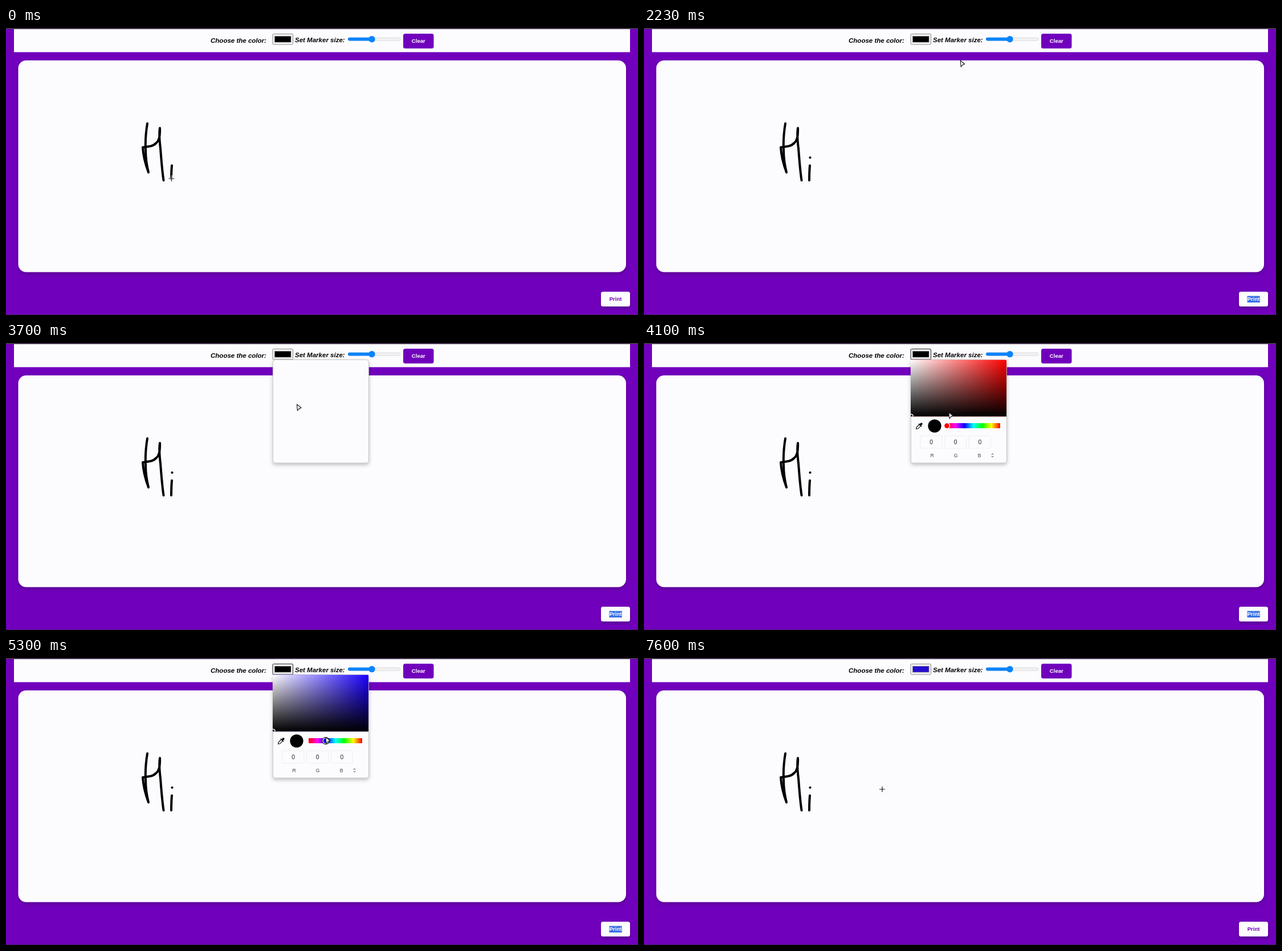
Recreate the animation shown at these times as an HTML page. Size 1109 by 505 pixels, loop 8000 ms.

```html
<!DOCTYPE html>
<html lang="en">
<head>
<meta charset="utf-8">
<title>Whiteboard</title>
<style>
html, body { margin: 0; width: 100%; height: 100%; overflow: hidden; background: #7100bd; }
svg { display: block; width: 1109px; height: 505px; font-family: "Liberation Sans", Arial, sans-serif; }
.label { font: italic bold 11.52px "Liberation Sans", Arial, sans-serif; }
.button { font-weight: bold; font-size: 9.6px; text-anchor: middle; }
.ink { fill: none; stroke: #000; stroke-width: 4; stroke-linecap: round; stroke-linejoin: round; }
.field rect { fill: #fcfcfe; stroke: #ededed; }
.field text { text-anchor: middle; font-size: 10.3px; fill: #222; }
.field .channel { font-size: 8.6px; fill: #444; }
</style>
</head>
<body>
<svg viewBox="0 0 1109 505">
  <defs>
    <linearGradient id="white"><stop stop-color="#fff"/><stop offset="1" stop-color="#fff" stop-opacity="0"/></linearGradient>
    <linearGradient id="black" x2="0" y2="1"><stop stop-opacity="0"/><stop offset="1"/></linearGradient>
    <linearGradient id="rainbow"></linearGradient>
    <clipPath id="area"><rect x="468" y="29.5" width="168" height="100"/></clipPath>
    <filter id="shadow" x="-10%" y="-10%" width="120%" height="130%">
      <feDropShadow dx="0" dy="3" stdDeviation="3" flood-opacity=".25"/>
    </filter>
  </defs>

  <rect width="1109" height="505" fill="#7100bd"/>
  <rect width="1109" height="2" fill="#46374f"/>
  <rect y="504" width="1109" height="1" fill="#4c1a70"/>
  <rect x="14" y="2" width="1081" height="40.5" fill="#fcfcfe"/>
  <rect x="21.5" y="57" width="1066.5" height="372.5" rx="14" fill="#fcfcfe" filter="url(#shadow)"/>

  <text class="label" x="359" y="26.4">Choose the color:</text>
  <text class="label" x="507" y="25.4">Set Marker size:</text>
  <rect id="frame" x="468" y="10.5" width="35.5" height="18.5" rx="1.5" fill="#f3f3f3"/>
  <rect id="swatch" x="471.5" y="14.5" width="28.5" height="10.5" stroke="#777" stroke-width=".7"/>

  <rect x="600" y="17" width="92" height="5.2" rx="2.6" fill="#f1f1f1" stroke="#c9c9c9" stroke-width=".6"/>
  <rect x="600" y="16.8" width="42" height="5.6" rx="2.8" fill="#0a84fa"/>
  <circle cx="642" cy="19.6" r="5.7" fill="#0a84fa"/>

  <rect x="697" y="10" width="53.5" height="26" rx="3.5" fill="#7100bd"/>
  <text class="button" x="723.8" y="25.5" fill="#fff">Clear</text>
  <rect x="1044" y="464" width="51" height="26" rx="3.5" fill="#fcfcfe" filter="url(#shadow)"/>
  <rect id="highlight" x="1058.5" y="471.5" width="22.3" height="11.5" fill="#3a70e4"/>
  <text id="print" class="button" x="1069.6" y="480.2">Print</text>

  <path class="ink" d="M248 168Q244 192 245 214Q245 234 250 254Q241 230 240 210L250 208.500Q258 208 264 202Q271 196 270 176Q268 188 271 212Q274 252 276.500 268"/>
  <path id="stem" class="ink"/>
  <circle id="dot" cx="291.5" cy="228"/>
  <circle id="newDot" cx="418" cy="231" r="1.7" fill="#260ed2"/>

  <g id="popup">
    <rect x="468.3" y="29.500" width="168.200" height="181.500" rx="4" fill="#fcfcfe" stroke="#b9b9b9" stroke-width=".8" filter="url(#shadow)"/>
    <g id="picker">
      <g clip-path="url(#area)">
        <rect id="hueArea" x="468" y="29.5" width="168" height="100"/>
        <rect x="468" y="29.5" width="168" height="100" fill="url(#white)"/>
        <rect x="468" y="29.5" width="168" height="100" fill="url(#black)"/>
        <g id="shade" fill="none">
          <circle r="4.5" stroke="#000" stroke-width="1.5"/>
          <circle r="3.2" stroke="#fff" stroke-width="1.5"/>
        </g>
      </g>
      <g transform="translate(483 146) rotate(45)">
        <path d="M-1.800 -1V5L0 7.500L1.800 5V-1" fill="none" stroke="#111" stroke-width="1.200"/>
        <path d="M-3.500 -2H3.500M0 -2V-5" stroke="#111" stroke-width="1.700"/>
        <rect x="-1.9" y="-7" width="3.8" height="4.5" rx="1.5" fill="#111"/>
      </g>
      <circle id="preview" cx="510" cy="146" r="11.6"/>
      <rect x="531" y="141" width="94" height="9" rx="1" fill="url(#rainbow)"/>
      <circle id="hueRing" cy="145.6" r="6.6"/>
      <circle id="hueKnob" cy="145.6" r="5" stroke="#fff" stroke-width="1.3"/>
      <g id="fields"></g>
      <path d="M609.800 196.500L611.600 194.600L613.400 196.500M609.800 199L611.600 200.900L613.400 199" fill="none" stroke="#333"/>
    </g>
  </g>

  <g id="cross" fill="none">
    <path d="M-5.500 0H5.500M0 -5.500V5.500" stroke="#fff" stroke-width="2.600" opacity=".75"/>
    <path d="M-5 0H5M0 -5V5" stroke="#222" stroke-width="1.200"/>
  </g>
  <path id="arrow" d="M0 .5L7.500 6.500Q3.500 7 1 11.500Q0 6 0 .5Z" fill="#fff" stroke="#222" stroke-width="1.2" stroke-linejoin="round"/>
</svg>
<script>
const $ = id => document.getElementById(id);
const set = (id, attrs) => { for (const k in attrs) $(id).setAttribute(k, attrs[k]); };
const show = (id, on) => { $(id).style.display = on ? '' : 'none'; };
const place = (id, x, y) => set(id, { transform: `translate(${x} ${y})` });

const BLUE = '#260ed2', PURPLE = '#7100bd';

$('rainbow').innerHTML = ['#f00', '#f0f', '#00f', '#0ff', '#0f0', '#ff0', '#f00']
  .map((c, i) => `<stop offset="${i / 6}" stop-color="${c}"/>`).join('');
$('fields').innerHTML = [...'RGB'].map((name, i) => {
  const x = 504 + i * 42.7;
  return `<g class="field"><rect x="${x - 19}" y="163" width="38" height="22" rx="2"/>
    <text class="value" x="${x}" y="177.7"></text>
    <text class="channel" x="${505.7 + i * 41.5}" y="201">${name}</text></g>`;
}).join('');
const values = document.querySelectorAll('.value');

// Pointer path: time, x, y
const path = [
  [0, 290.5, 265], [100, 290, 267], [230, 291.5, 258], [600, 291.5, 258], [870, 291.5, 228],
  [1669, 291.5, 228], [1670, 337, 210], [2000, 337, 210], [2230, 555.5, 57], [2500, 515, 32],
  [2800, 484, 15], [3500, 484, 15], [3700, 510.5, 107.5], [4000, 532, 121], [4300, 541, 123],
  [4870, 560.5, 131.5], [5130, 561, 139], [5970, 562, 139], [6100, 605, 85], [6200, 614, 55],
  [6569, 614, 55], [6570, 596, 84], [6600, 580, 109], [7129, 580, 109], [7130, 418, 231], [8000, 418, 231]
];

function pointer(t) {
  const i = path.findIndex(p => p[0] > t);
  const [t0, x0, y0] = path[i - 1], [t1, x1, y1] = path[i];
  const k = (t - t0) / (t1 - t0);
  return [x0 + (x1 - x0) * k, y0 + (y1 - y0) * k];
}

function draw(t) {
  const during = (a, b) => t >= a && t < b;
  const selected = during(1230, 7600), hueSet = t >= 5170, picked = t >= 6170, settled = t >= 6570;
  const [x, y] = pointer(t);

  const crossed = t < 2200 || t >= 7130;
  show('cross', crossed);
  show('arrow', !crossed);
  place(crossed ? 'cross' : 'arrow', x, y);

  set('stem', { d: `M291 242Q290 254 290 ${Math.min(268, 265 + t * 0.03)}` });
  show('dot', t >= 1230);
  set('dot', { r: t < 1400 ? 1.6 : 2.1 });
  show('newDot', t >= 7600);

  show('highlight', selected);
  set('print', { fill: selected ? '#fff' : PURPLE });
  set('frame', { stroke: during(2860, 3170) || during(3900, 7130) ? '#222' : '#8c8c8c' });
  set('swatch', { fill: picked ? BLUE : '#000' });

  show('popup', during(3500, 7130));
  show('picker', t >= 3900);
  const hue = hueSet ? '#00f' : '#f00', hueX = hueSet ? 561 : 531.5;
  set('hueArea', { fill: hueSet ? '#1a00ff' : '#f00' });
  set('hueKnob', { cx: hueX, fill: hue });
  set('hueRing', { cx: hueX });
  show('hueRing', during(5170, 6000));
  place('shade', picked ? 613.7 : 469, picked ? 55.3 : 128.5);
  set('preview', { fill: settled ? BLUE : '#000' });
  (settled ? [35, 24, 191] : [0, 0, 0]).forEach((v, i) => { values[i].textContent = v; });
}

function tick() {
  draw(performance.now() % 8000);
  requestAnimationFrame(tick);
}
tick();
</script>
</body>
</html>
```
